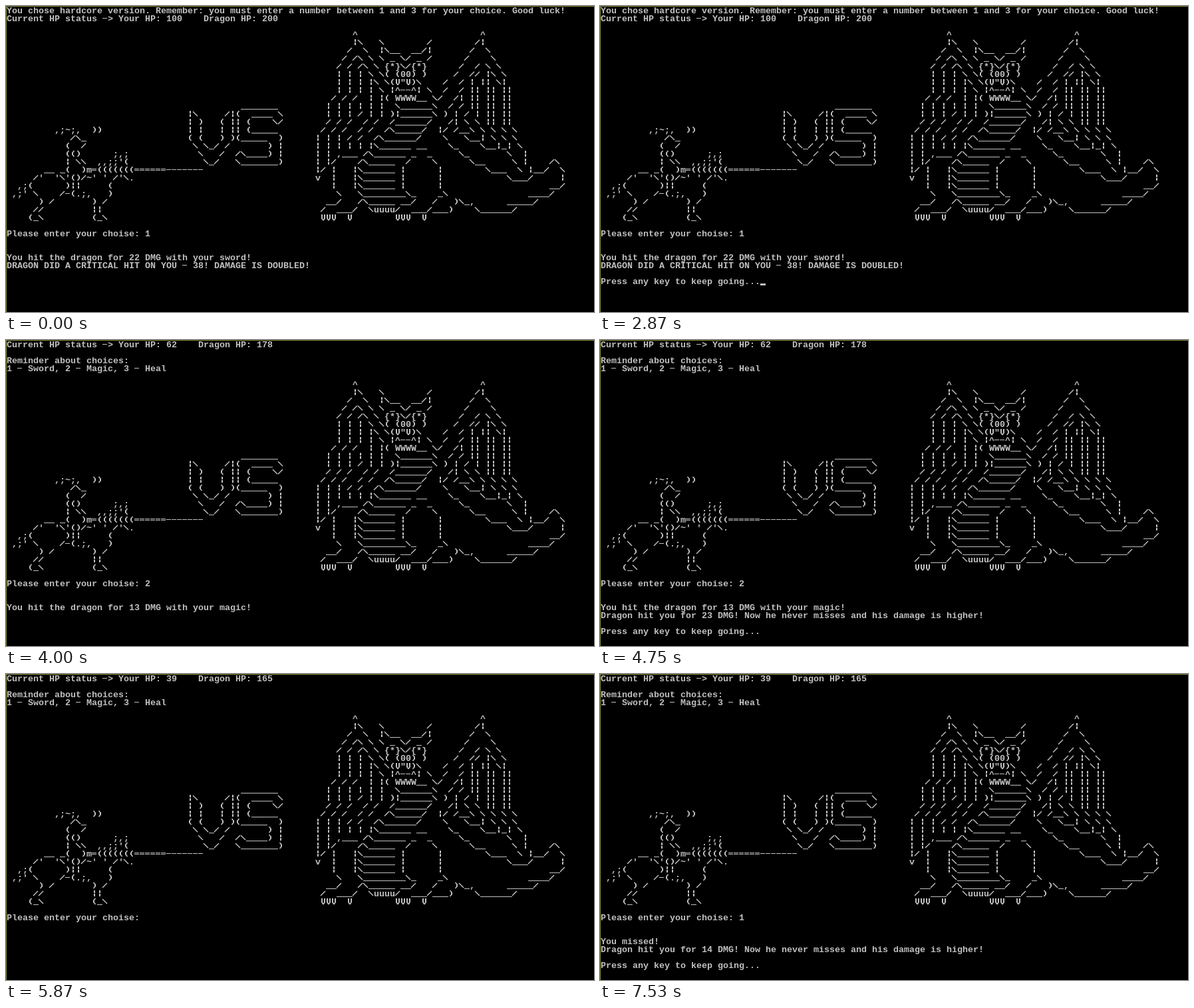
Animation of 884 by 461 pixels, one loop 8 s. Source, as an HTML page with a canvas:

```html
<!DOCTYPE html>
<html lang="en">
<head>
<meta charset="utf-8">
<title>Knight vs Dragon</title>
<style>
  html, body { margin: 0; width: 100%; height: 100%; overflow: hidden; background: #000; }
  canvas { display: block; }
</style>
</head>
<body>
<canvas id="stage" width="884" height="461"></canvas>
<script>
const ctx = document.getElementById('stage').getContext('2d');
const CELL_W = 8, CELL_H = 12, LOOP = 8000;
const INK = '#c0c0c0', EDGE = '#84843a', CURSOR = '▂';

const dragon = String.raw`
       ^                       ^
       |\   \        /        /|
      /  \  |\__  __/|       /  \
     / /\ \ \ _ \/ _ /      /    \
    / / /\ \ {*}\/{*}      /  / \ \
    | | | \ \( (00) )     /  // |\ \
    | | | |\ \(V"V)\    /  / | || \|
    | | | | \ |^--^| \  /  / || || ||
   / / /  | |( WWWW__ \/  /| || || ||
  | | | | | |  \______\  / / || || ||
  | | | / | | )|______\ ) | / | || ||
  / / /  / /  /______/   /| \ \ || ||
 / / /  / /  /\_____/  |/ /__\ \ \ \ \
| | | / /  /\______/    \   \__| \ \ \
| | | | | |\______ __    \_    \__|_| \
| | ,___ /\______ _  _     \_       \  |
| |/    /\_____  /    \      \__     \ |    /\
|/ |   |\______ |      |        \___  \ |__/  \
v  |   |\______ |      |            \___/     |
   |   |\______ |      |                    __/
    \   \________\_    _\               ____/
  __/   /\_____ __/   /   )\_,      _____/
 /  ___/  \uuuu/  ___/___)    \______/
 VVV  V        VVV  V
`.slice(1);

const versus = String.raw`
          _______
|\     /|(  ____ \
| )   ( || (    \/
| |   | || (_____
( (   ) )(_____  )
 \ \_/ /       ) |
  \   /  /\____) |
   \_/   \_______)
`.slice(1);

const knight = String.raw`
         ,;~;,  ))
            /\_
           (  /
           (()      ;,;
           | \\  ,,;;'(
       __ _(  )m=(((((((======-------
     /'  '\'()/~' ' /'\.
  ,;(      )||     (
 ,;' \    /-(.;,   )
      ) /       ) /
     //         ||
    (_\         (_\
`.slice(1);

// Line glyphs of the console font: [x1, y1, x2, y2, width] inside a cell.
const strokes = {
  '_': [[0, 10.5, 8, 10.5, 1]],
  '-': [[0, 5.5, 7, 5.5, 1]],
  '=': [[0, 4.5, 7, 4.5, 1], [0, 6.5, 7, 6.5, 1]],
  '|': [[4, 1, 4, 5, 2], [4, 6, 4, 10, 2]],
  '/': [[7, 2, 0, 9, 1.4]],
  '\\': [[0, 2, 7, 9, 1.4]],
  '(': [[5.5, 1, 3, 4, 1.6], [3, 3.5, 3, 7.5, 2], [3, 7, 5.5, 10, 1.6]],
  ')': [[2.5, 1, 5, 4, 1.6], [5, 3.5, 5, 7.5, 2], [5, 7, 2.5, 10, 1.6]],
  'V': [[2, 1, 2, 7.5, 2], [6, 1, 6, 7.5, 2], [2, 7, 4, 10, 1.6], [6, 7, 4, 10, 1.6]],
  [CURSOR]: [[0, 10.5, 8, 10.5, 3]]
};

function drawChar(ch, x, y) {
  if (!strokes[ch]) {
    ctx.fillText(ch, x, y + 10);
    return;
  }
  for (const [x1, y1, x2, y2, width] of strokes[ch]) {
    ctx.lineWidth = width;
    ctx.beginPath();
    ctx.moveTo(x + x1, y + y1);
    ctx.lineTo(x + x2, y + y2);
    ctx.stroke();
  }
}

function print(text, col, row) {
  text.split('\n').forEach((line, i) => {
    [...line].forEach((ch, j) => {
      if (ch !== ' ') drawChar(ch, 1 + (col + j) * CELL_W, 1 + (row + i) * CELL_H);
    });
  });
}

const status = (you, foe) => `Current HP status -> Your HP: ${you}    Dragon HP: ${foe}`;
const PROMPT = 'Please enter your choise: ';
const PRESS = 'Press any key to keep going...';
const REMINDER = 'Reminder about choices:\n1 - Sword, 2 - Magic, 3 - Heal';
const dragonHit = damage =>
  `Dragon hit you for ${damage} DMG! Now he never misses and his damage is higher!`;

// Each cue: [from, to, text, column, row]
const scene = (from, to, top) => [
  [from, to, dragon, 58, top],
  [from, to, versus, 34, top + 9],
  [from, to, knight, 0, top + 12],
  [from, to, PROMPT, 0, top + 25]
];

const laterTurn = (from, to, hp, answerAt, answer, hitAt, hit, replyAt, damage) => [
  ...scene(from, to, 5),
  [from, to, hp, 0, 0],
  [from, to, REMINDER, 0, 2],
  [answerAt, to, answer, 26, 30],
  [hitAt, to, hit, 0, 33],
  [replyAt, to, dragonHit(damage), 0, 34],
  [replyAt, to, PRESS, 0, 36]
];

const cues = [
  ...scene(0, 3250, 3),
  [0, 3250, 'You chose hardcore version. Remember: you must enter a number between 1 and 3 for your choice. Good luck!', 0, 0],
  [0, 3250, status(100, 200), 0, 1],
  [0, 3250, '1', 26, 28],
  [0, 3250, 'You hit the dragon for 22 DMG with your sword!', 0, 31],
  [0, 3250, 'DRAGON DID A CRITICAL HIT ON YOU - 38! DAMAGE IS DOUBLED!', 0, 32],
  [750, 1250, CURSOR, 0, 33],
  [1870, 2120, CURSOR, 0, 33],
  [2120, 3250, PRESS, 0, 34],
  [2870, 3250, CURSOR, 30, 34],
  ...laterTurn(3250, 5870, status(62, 178), 3750, '2',
    4000, 'You hit the dragon for 13 DMG with your magic!', 4750, 23),
  [5500, 5870, CURSOR, 30, 36],
  ...laterTurn(5870, LOOP, status(39, 165), 6640, '1',
    6890, 'You missed!', 7530, 14)
];

function draw(time) {
  ctx.fillStyle = '#000';
  ctx.fillRect(0, 0, 884, 461);
  ctx.fillStyle = EDGE;
  ctx.fillRect(0, 0, 884, 1);
  ctx.fillRect(0, 0, 1, 461);
  ctx.fillStyle = ctx.strokeStyle = INK;
  ctx.font = 'bold 13.33px "Liberation Mono", monospace';
  for (const [from, to, text, col, row] of cues) {
    if (time >= from && time < to) print(text, col, row);
  }
}

const start = performance.now();
function tick() {
  draw((performance.now() - start) % LOOP);
  requestAnimationFrame(tick);
}
tick();
</script>
</body>
</html>
```
